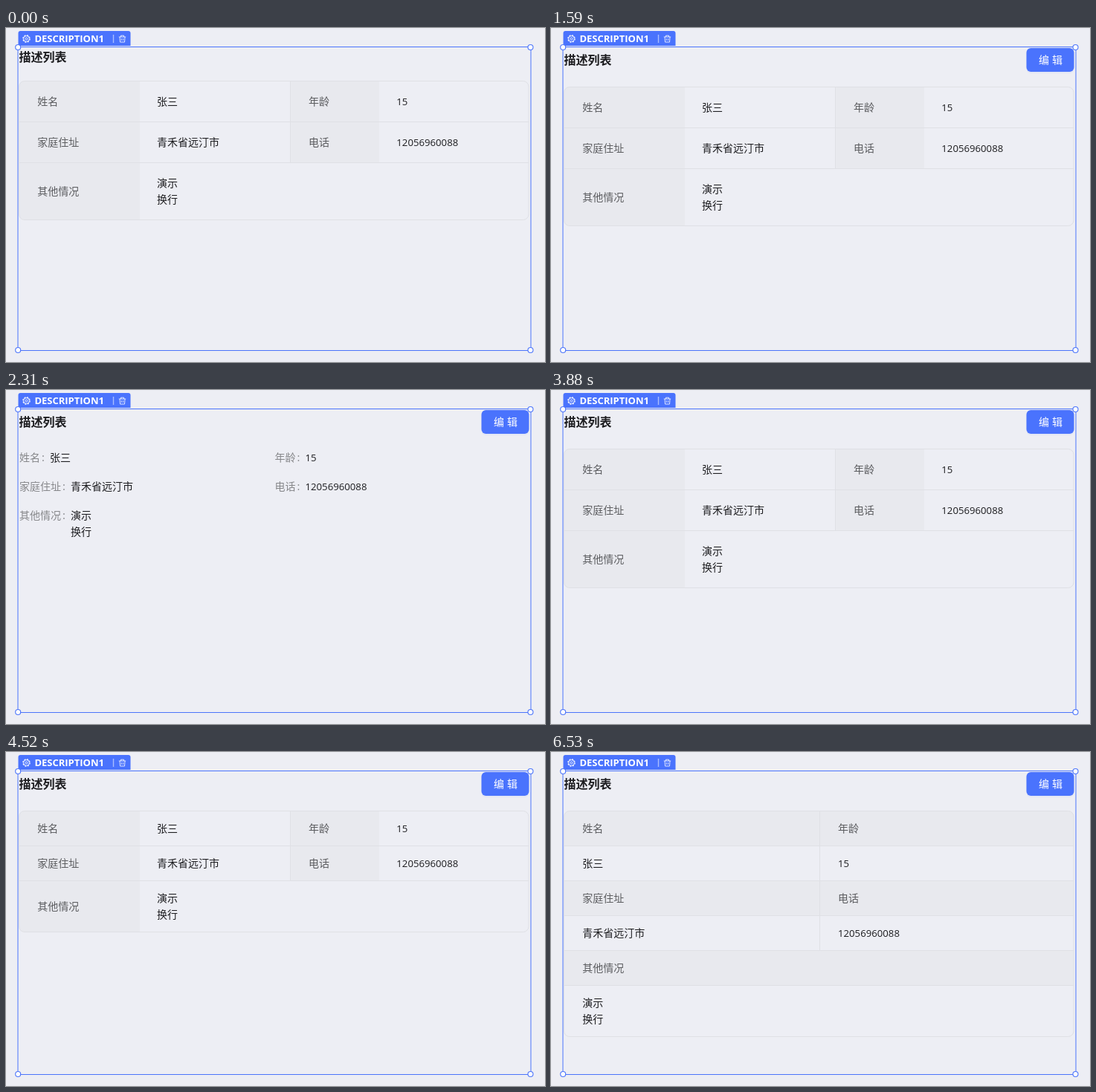
Animation of 725x450 px, one loop 8 s. Source, as an HTML page:

```html
<!DOCTYPE html>
<html lang="zh-CN">
<head>
<meta charset="utf-8">
<title>描述列表</title>
<style>
  html, body { margin: 0; width: 100%; height: 100%; overflow: hidden; background: #edeef4; }
  svg { display: block; }
  text { font: 14px "Noto Sans CJK SC", "Noto Sans CJK", sans-serif; fill: #1c1c1f; white-space: pre; }
  .num { font: 13.2px "Open Sans", sans-serif; }
  .label { fill: #5b5c5f; }
  .soft { fill: #86878a; }
  .title { font-size: 16px; font-weight: 700; }
  .tag { font: 700 13px "Open Sans", sans-serif; fill: #fff; }
  .btn { fill: #fff; letter-spacing: 4px; }
  .line { fill: none; stroke: #dfe0e5; }
  .head { fill: #e8e9ee; }
  .icon { fill: none; stroke: #fff; }
</style>
</head>
<body>
<svg id="stage" width="725" height="450" viewBox="0 0 725 450">
  <g id="views"></g>
  <rect x="16" y="25.5" width="690" height="409" fill="none" stroke="#4b74fb"/>
  <path d="M16.5 24V7a3 3 0 0 1 3-3h145a3 3 0 0 1 3 3v17z" fill="#4a73fd"/>
  <g class="icon">
    <circle cx="27.5" cy="14.5" r="4.7" stroke-width="1.1" stroke-dasharray="2.1 1.59"/>
    <circle cx="27.5" cy="14.5" r="3.9" stroke-width=".9"/>
    <circle cx="27.5" cy="14.5" r="1.5" stroke-width=".9"/>
    <path d="M144.5 9v11" stroke="#a9bdfe" stroke-width="1.4"/>
    <path d="M151.8 12h9.4M154.5 12v-1.8h4v1.8M153 12l.5 7h6l.5-7M155.3 14.2v2.6M157.7 14.2v2.6" stroke-width=".8"/>
  </g>
  <text class="tag" x="38.4" y="19">DESCRIPTION1</text>
  <g id="grips" fill="#fff" stroke="#4b74fb" stroke-width="1.1"></g>
</svg>
<script>
const LOOP = 8000;
const LEFT = 17.5, RIGHT = 703;
const ADDRESS = '青禾省远汀市', PHONE = '12056960088';
const FIELDS = [['姓名', '张三'], ['年龄', '15'], ['家庭住址', ADDRESS], ['电话', PHONE], ['其他情况', '演示', '换行']];
const [NAME, AGE, HOME, TEL, OTHER] = FIELDS;

const text = (x, y, s, cls = '') =>
  `<text x="${x}" y="${y}" class="${cls}${/^\d/.test(s) ? ' num' : ''}">${s}</text>`;
const head = (x1, x2, y1, y2) =>
  `<rect class="head" x="${x1}" y="${y1}" width="${x2 - x1}" height="${y2 - y1}"/>`;
const hline = y => `<path class="line" d="M${LEFT} ${y}H${RIGHT}"/>`;
const vline = (x, y1, y2) => `<path class="line" d="M${x} ${y1}V${y2}"/>`;

// Rounded outline whose contents are clipped to it
function box(id, top, bottom, content) {
  const shape = `x="${LEFT}" y="${top}" width="${RIGHT - LEFT}" height="${bottom - top}" rx="7.5"`;
  return `<clipPath id="${id}"><rect ${shape}/></clipPath>
    <g clip-path="url(#${id})">${content}</g><rect class="line" ${shape}/>`;
}

function table(id, top, pad) {
  const row = 23 + pad * 2, mid = top + row, low = mid + row, end = low + row + 22;
  const base = y => y + row / 2 + 5;
  const pair = (y, a, b) =>
    text(42.3, base(y), a[0], 'label') + text(203, base(y), a[1]) +
    text(407, base(y), b[0], 'label') + text(525.3, base(y), b[1]);
  return box(id, top, end,
    head(LEFT, 180, top, end) + head(382, 502, top, low) + hline(mid) + hline(low) + vline(382.5, top, low)) +
    pair(top, NAME, AGE) + pair(mid, HOME, TEL) +
    text(42.3, base(low) + 11, OTHER[0], 'label') +
    text(203, base(low), OTHER[1]) + text(203, base(low) + 22, OTHER[2]);
}

function stacked(id, top) {
  const row = 47, y = i => top + row * i, base = i => y(i) + row / 2 + 5;
  const end = y(6) + 22;
  const cell = (x, i, f) => text(x, base(i), f[0], 'label') + text(x, base(i + 1), f[1]);
  const fills = [0, 2, 4].map(i => head(LEFT, RIGHT, y(i), y(i + 1))).join('');
  const lines = [1, 2, 3, 4, 5].map(i => hline(y(i))).join('');
  return box(id, top, end, fills + lines + vline(361.5, top, y(4))) +
    cell(42.3, 0, NAME) + cell(386, 0, AGE) + cell(42.3, 2, HOME) + cell(386, 2, TEL) +
    cell(42.3, 4, OTHER) + text(42.3, base(5) + 22, OTHER[2]);
}

function plain() {
  const item = (x, y, f) => {
    const w = f[0].length * 14;
    return text(x, y, f[0], 'soft') + text(x + w + 2, y, ':', 'soft') +
      f.slice(1).map((s, i) => text(x + w + 13, y + i * 22, s)).join('');
  };
  return item(18, 96, NAME) + item(361.5, 96, AGE) + item(18, 135, HOME) +
    item(361.5, 135, TEL) + item(18, 174, OTHER);
}

const title = y => text(17.6, y, '描述列表', 'title');
const header = title(49) +
  `<rect x="639.5" y="29" width="64" height="32" rx="6" fill="#e2e6f5"/>
   <rect x="639.5" y="27" width="64" height="32" rx="6" fill="#4a73fd"/>` +
  text(656, 48, '编辑', 'btn');

const steps = [
  [0, title(45) + table('t0', 71.5, 16)],
  [500, header + table('t1', 79.5, 16)],
  [2310, header + plain()],
  [2910, header + table('t2', 79.5, 16)],
  [4520, header + table('t3', 79.5, 12)],
  [6530, header + stacked('t4', 79.5)]
];

const views = document.getElementById('views');
views.innerHTML = steps.map(([, view]) => `<g visibility="hidden">${view}</g>`).join('');
document.getElementById('grips').innerHTML = [16.2, 705.5].map(x =>
  [26, 434].map(y => `<circle cx="${x}" cy="${y}" r="3.5"/>`).join('')).join('');

let shown = -1;
function draw() {
  const t = performance.now() % LOOP;
  const now = steps.filter(([at]) => at <= t).length - 1;
  if (now !== shown) {
    [...views.children].forEach((g, i) => g.setAttribute('visibility', i === now ? 'visible' : 'hidden'));
    shown = now;
  }
  requestAnimationFrame(draw);
}
draw();
</script>
</body>
</html>
```
